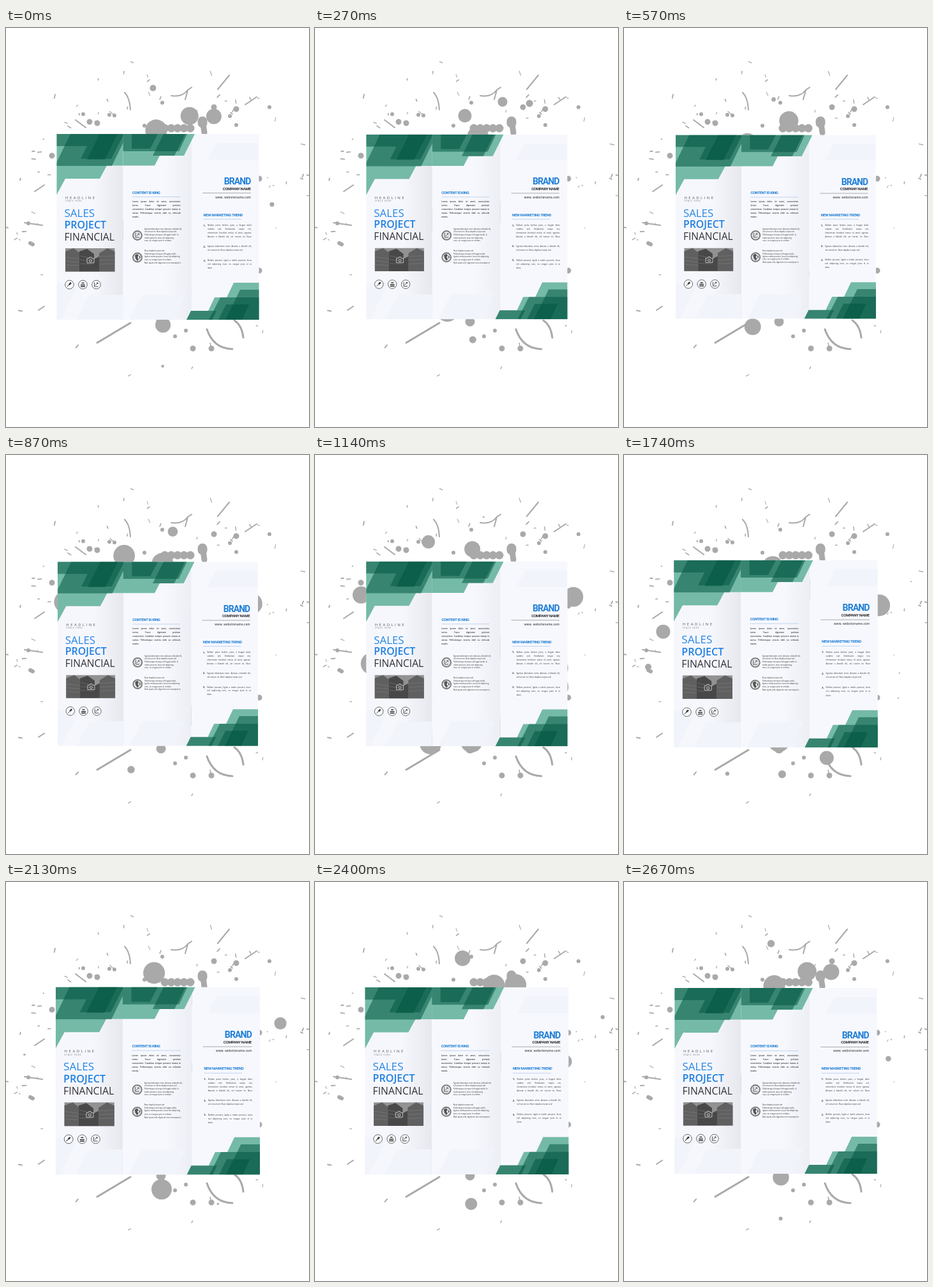
These frames come from a looping animation (475 by 625 pixels, 2700 ms). An HTML page:

```html
<!DOCTYPE html>
<html lang="en">
<head>
<meta charset="utf-8">
<title>Brochure on ink splash</title>
<style>
  html, body { margin: 0; width: 100%; height: 100%; overflow: hidden; background: #fff; }
  svg, #card { position: absolute; left: 0; top: 0; width: 475px; height: 625px; }
  #card { transform-origin: 238px 311.5px; font-family: "Open Sans", sans-serif; }
  #splash { fill: none; stroke: #a9a9a9; stroke-linecap: round; }
  #drops { fill: #a9a9a9; stroke: none; }
  .shade path { fill: #005540; fill-opacity: .52; }
  .head { font-family: Roboto, sans-serif; font-weight: 700; letter-spacing: -.065em; fill: #1f7fd6; }
  p { position: absolute; margin: 0; color: #333; white-space: nowrap; text-align-last: justify; }
  p span { display: block; text-align-last: left; }
  .lead { left: 198px; width: 75.5px; font-size: 3.1px; line-height: 6.2px; font-weight: 600; }
  .note { left: 217px; width: 56px; font-size: 2.75px; line-height: 4.7px; text-align-last: left; }
  .item { left: 316px; width: 69px; font-size: 3px; line-height: 6.2px; }
</style>
</head>
<body>
<svg id="splash" viewBox="0 0 475 625">
  <g id="flecks"></g>
  <path stroke-width="2" d="M350 74l-18 22M186 101q8 8 9 27M259 106q17 3 26-9l6-4M285 97l-4 15M109 144l16 12M29 305l28 4M45 256l15-10M51 442l9-6M375 120l18-12"/>
  <path stroke-width="3" d="M143 493l52-31M315 472q10 30 40 31M358 458q12 8 14 27"/>
  <path stroke-width="6" d="M121 135h0M162 136h0M170 137h0M217 153h0M245 117h0M351 138h0M361 152h0M413 124h0M35 306h0M38 337l4 2M265 483h0M282 474h0"/>
  <path stroke-width="9" d="M131 147h0M143 149h0M326 124h0M361 127h0M72 200h0M397 236h0M397 380h0M293 502h0M322 502h0"/>
  <path stroke-width="13" stroke-dasharray="0 10" d="M249 157h44"/>
  <path stroke-width="15" d="M308 146v3M243 460h0"/>
  <path stroke-width="9" d="M309 150l2 14"/>
  <g id="drops"></g>
</svg>

<div id="card">
  <svg viewBox="0 0 475 625">
    <defs>
      <linearGradient id="left"><stop offset=".55" stop-color="#f6f7fd"/><stop offset="1" stop-color="#e6e8ee"/></linearGradient>
      <linearGradient id="mid"><stop offset=".6" stop-color="#f7f8fd"/><stop offset="1" stop-color="#eceef5"/></linearGradient>
      <clipPath id="sheet"><path d="M79.500 166h317v291h-317z"/></clipPath>
    </defs>
    <g clip-path="url(#sheet)">
      <path fill="url(#left)" d="M79 166h104.500v291H79z"/>
      <path fill="url(#mid)" d="M183.500 166H291v291H183.500z"/>
      <path fill="#f7f8fe" d="M291 166h106v291H291z"/>
      <path fill="#f2f4fb" d="M79 400h35l-28 57h-7zM130 418h53v39h-73zM213 418h68l-20 39h-68zM330 180h66v26h-80z"/>

      <path fill="#74baa7" d="M79 166h104.500v49.500H158L147 236H93L79 262z"/>
      <path fill="#74baa7" d="M183.500 166H296l-17 34h-38l-8 15.500h-49.500z"/>
      <path fill="#74baa7" d="M283 457l7-14h27l10-21h19l11-23h40v58z"/>
      <g class="shade">
        <path d="M101 166h82.500v14L166 216H79v-5z"/>
        <path d="M79 166h104.500v3L165 205h-48l10-20H79z"/>
        <path d="M147 166h28l-20 40h-28z"/>
        <path d="M183.500 166H284l-13 27h-87.500z"/>
        <path d="M197 166h41l-12 23h-29z"/>
        <path d="M247 166h34l-17 34h-34z"/>
        <path d="M290 443h40l-7 14h-40z"/>
        <path d="M336 422h61v35h-79z"/>
        <path d="M345 433h36l-11 24h-37z"/>
        <path d="M367 410h30v47h-53z"/>
      </g>
    </g>

    <path stroke="#9cbde0" stroke-width=".6" d="M198 264.500h75.500M309.500 299.500H369"/>
    <path stroke="#888" stroke-width=".7" d="M308 258.500h76"/>

    <text x="93" y="267.500" font-size="6" letter-spacing="2.5" fill="#555">HEADLINE</text>
    <text x="93" y="272" font-size="2.8" letter-spacing="1.1" fill="#666">SPACE HERE</text>
    <text x="91.500" y="295.500" font-size="17" fill="#2586e3">SALES</text>
    <text x="91.500" y="313.500" font-size="16" font-weight="600" fill="#1f7fe0">PROJECT</text>
    <text x="91.500" y="332.500" font-size="15.700" font-weight="500" fill="#303035">FINANCIAL</text>
    <text class="head" x="198" y="259.500" font-size="6">CONTENT IS KING</text>
    <text class="head" x="309.500" y="294.500" font-size="6">NEW MARKETING TREND</text>
    <text class="head" x="383.500" y="245" font-size="14" text-anchor="end">BRAND</text>
    <text class="head" x="383.500" y="253.500" font-size="6.200" text-anchor="end" style="fill:#333">COMPANY NAME</text>
    <text x="384" y="266.500" font-size="4.400" font-weight="600" letter-spacing=".2" text-anchor="end" fill="#444">www. websitename.com</text>
    <g font-size="4" font-weight="700" fill="#333">
      <text x="309.500" y="310.500">1-</text><text x="309.500" y="343.500">2-</text><text x="309.500" y="365.500">3-</text>
    </g>

    <path fill="#929292" d="M93 345h77.500v36.500H93z"/>
    <path fill="#606060" d="M93 350l13-5 9 7v29.500H93zM146 353l13-8 11.500 5v31.500H146z"/>
    <path fill="#484848" d="M115 350l12-4 11 8v27.500h-23zM138 362l8-4v23.500h-8z"/>
    <path stroke="#858585" stroke-width=".5" d="M94 359l21 3M94 365l21 2M94 371l21 1M116 357l20 4M116 363l20 2M116 369l20 1M147 358l22-1M147 364l22-1M147 370l22-1"/>
    <g fill="none" stroke="#ddd" stroke-width=".8">
      <path d="M127 361h3l1-2h3l1 2h3v7h-11z"/><circle cx="132.500" cy="364.500" r="2"/>
    </g>

    <g fill="#fafbff" stroke="#444" stroke-width=".8">
      <circle cx="99.500" cy="402" r="6.800"/><circle cx="120.500" cy="402" r="6.800"/><circle cx="141.500" cy="402" r="6.800"/>
    </g>
    <g fill="none" stroke="#333">
      <path stroke-width="2.500" d="M99 402l3-3"/><path d="M96 405l3-3"/>
      <path stroke-width="1.500" d="M118.500 399.500h4M117 402.500h7M117 405h7"/>
      <path stroke-width=".9" d="M138.500 398.500v6.500h6M140 403l4-4M144 401v-2h-2"/>
    </g>
    <g fill="#e4e5e8" stroke="#777" stroke-width="1.800">
      <circle cx="206" cy="325" r="7"/><circle cx="206" cy="359.500" r="7"/>
    </g>
    <path fill="none" stroke="#555" stroke-width=".9" d="M203 321v7h6M204.500 326l4-4M208.500 324v-2h-2"/>
    <path fill="#555" d="M202 356l4-2 2 3-2 2 2 3-2 3-3-4zM209 356l2 3-2 3z"/>
  </svg>

  <p class="lead" style="top:268.500px">Lorem ipsum dolor sit amet, consectetur<br>tortor. Fusce dignissim pretium<br>consectetur. Curabitur tempor posuere massa in<br>varius. Pellentesque viverra nibh eu vehicula<span>mattis.</span></p>
  <p class="note" style="top:312.500px">Egestas bibendum enim. Aenean a blandit elit,<br>vel rutrum mi. Nunc dapibus turpis sed<br>Pellentesque id neque id feugiat mollis. In<br>mattis posuere, lacus nisl adipiscing<br>nunc, eu congue justo et ut diam.</p>
  <p class="note" style="top:347px">Nunc dapibus turpis sed<br>Pellentesque id neque id feugiat mollis.<br>ligula a mattis posuere, lacus nisl adipiscing<br>nunc, eu congue justo et ut diam.<br>Nam quam velit, dignissim non consequat in.</p>
  <p class="item" style="top:305.500px">Nullam porta facilisis justo, a feugiat dolor<br>sodales sed. Vestibulum neque nisi,<br>elementum tincidunt metus sit amet, egestas.<br>Aenean a blandit elit, vel rutrum mi. Nunc</p>
  <p class="item" style="top:338.500px">Egestas bibendum enim. Aenean a blandit elit,<span>vel rutrum mi. Nunc dapibus turpis sed</span></p>
  <p class="item" style="top:360.500px">Nullam posuere, ligula a mattis posuere, lacus<br>nisl adipiscing nunc, eu congue justo et ut<span>diam.</span></p>
</div>

<script>
  const LOOP = 2700, STEP = 30;
  const CENTER = { x: 238, y: 311 };
  const SPEED = 0.085, SHRINK = 0.024, MAX_RADIUS = 17;

  // Every drop flies outward and shrinks: angle (deg), reach (px), time it vanishes (ms).
  const drops = [
    [88, 227, 95], [-92, 235, 210], [87, 197, 500], [-63, 236, 500],
    [-74, 230, 585], [-91, 211, 710], [103, 207, 1110], [-83, 220, 1195],
    [-109, 222, 1575], [-87, 208, 1660], [-151, 237, 1700], [-28, 244, 1785],
    [9, 200, 1785], [20, 208, 1785], [112, 214, 1870], [174, 219, 1950],
    [87, 211, 1995], [191, 219, 2200], [64, 221, 2200], [-25, 246, 2530],
    [-11, 195, 2850]
  ];

  const byId = id => document.getElementById(id);
  const card = byId("card");

  function add(parent, name, attributes) {
    const node = document.createElementNS("http://www.w3.org/2000/svg", name);
    for (const key in attributes) node.setAttribute(key, attributes[key]);
    return parent.appendChild(node);
  }

  function polar(degrees, distance) {
    const angle = degrees * Math.PI / 180;
    return { x: CENTER.x + distance * Math.cos(angle), y: CENTER.y + distance * Math.sin(angle) };
  }

  // Fine spatter, denser above the card than below.
  let seed = 7;
  const random = () => (seed = seed * 16807 % 2147483647) / 2147483647;
  for (let i = 0; i < 64; i++) {
    const degrees = i % 5 ? -185 + 180 * random() : 180 * random();
    const distance = 185 + 75 * random() ** 1.5;
    const from = polar(degrees, distance);
    const to = polar(degrees + 2 * random() - 1, distance + 6 * random());
    add(byId("flecks"), "line", {
      x1: from.x, y1: from.y, x2: to.x, y2: to.y, "stroke-width": 1 + random()
    });
  }

  const circles = drops.map(() => add(byId("drops"), "circle", {}));

  function draw(time) {
    const t = Math.floor(time % LOOP / STEP) * STEP;
    drops.forEach(([degrees, reach, end], i) => {
      const left = (end - t + LOOP) % LOOP;
      const { x, y } = polar(degrees, Math.max(0, reach - SPEED * left));
      circles[i].setAttribute("cx", x);
      circles[i].setAttribute("cy", y);
      circles[i].setAttribute("r", Math.min(MAX_RADIUS, SHRINK * left));
    });
    card.style.transform = `scale(${1 - 0.01 * Math.sin(2 * Math.PI * t / LOOP)})`;
  }

  const start = performance.now();
  function tick() {
    draw(performance.now() - start);
    requestAnimationFrame(tick);
  }
  tick();
</script>
</body>
</html>
```
